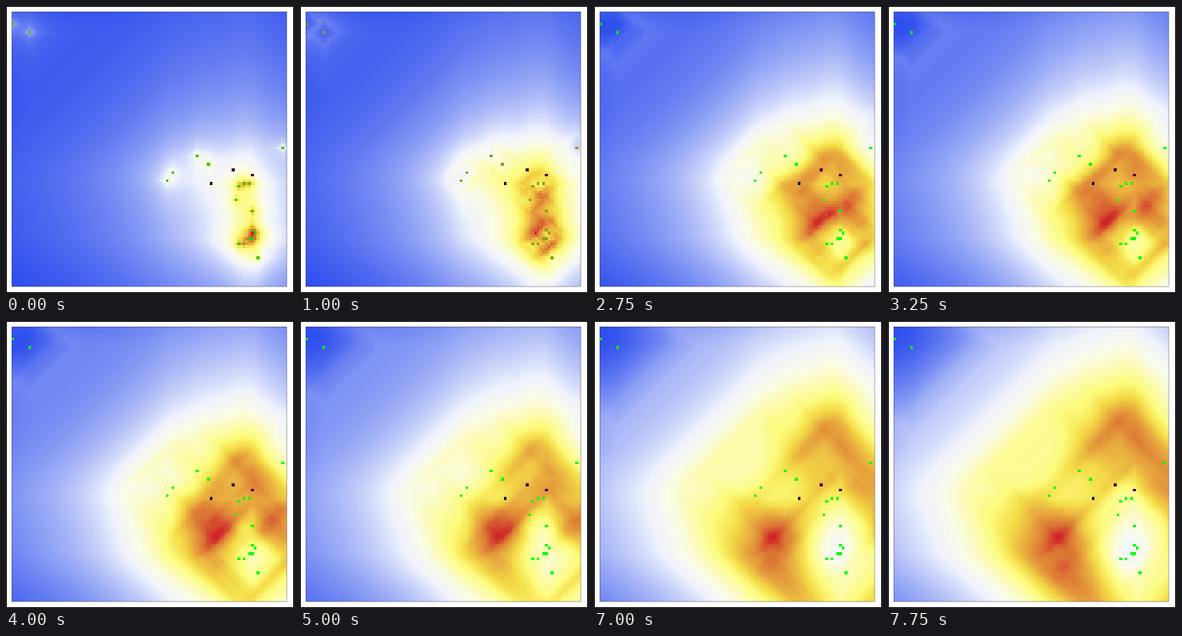
Animation of 360x359 px, one loop 8 s. Source, as a matplotlib script:

```python
import numpy as np
import matplotlib.pyplot as plt
from matplotlib.animation import FuncAnimation
from matplotlib.colors import LinearSegmentedColormap, to_rgb
from matplotlib.patches import Rectangle

# Geographic profiling (Rossmo's formula) with a growing buffer radius
W, H, DPI = 360, 359, 64
EDGE, SIDE = 6.55, 344
CELLS, STEPS, INTERVAL = 100, 32, 250
F, G = 0.5, 1.0

# Sites as (column, row) cells: the far pair, the middle arc, the cluster
FAR = [(0, 4), (6, 7)]
ARC = [(67, 52), (71, 55), (58, 58), (56, 61), (98, 49)]
CLUSTER = [(82, 63), (84, 62), (86, 62), (81, 68), (87, 72), (87, 79),
           (88, 80), (86, 82), (87, 82), (82, 84), (84, 84), (89, 89)]
SITES = FAR + ARC + CLUSTER
PURPLE = [(80, 57), (87, 59)]
BLACK = [(72, 62)]

CMAP = LinearSegmentedColormap.from_list("temperature", [
    (0, "#2e4eee"), (5 / 12, "#eff3fd"), (1 / 2, "#fbfce9"),
    (2 / 3, "#fdfb7b"), (3 / 4, "#f4dc48"), (11 / 12, "#db7334"),
    (1, "#d0222a")], N=512)

rows, cols = np.mgrid[0:CELLS, 0:CELLS]
DIST = np.array([abs(cols - x) + abs(rows - y) for x, y in SITES], float)


def profile(radius):
    outside = np.maximum(DIST, radius) ** -F
    inside = radius ** (G - F) / (2 * radius - np.minimum(DIST, radius)) ** G
    score = np.where(DIST > radius, outside, inside).sum(axis=0)
    return (score - score.min()) / np.ptp(score)


def site_color(step):
    if step == 0:
        return "#3dc70f"
    return "#87a11a" if step < 7 else "#00ff00"


def picture(step):
    rgb = CMAP(profile(step + 1.0))[..., :3]
    for cells, color in ((SITES, site_color(step)),
                         (PURPLE, "#500050"), (BLACK, "black")):
        for x, y in cells:
            rgb[y, x] = to_rgb(color)
    return rgb


fig = plt.figure(figsize=(W / DPI, H / DPI), dpi=DPI, facecolor="white")
ax = fig.add_axes([0, 0, 1, 1])
image = ax.imshow(picture(0), interpolation="nearest", aspect="auto",
                  extent=(EDGE, EDGE + SIDE, EDGE + SIDE, EDGE))
ax.set(xlim=(0, W), ylim=(H, 0))
ax.axis("off")


def outline(x, y, w, h, color, alpha=1.0):
    ax.add_patch(Rectangle((x, y), w, h, fill=False, edgecolor=color,
                           alpha=alpha, linewidth=72 / DPI, snap=False))


outline(0.5, 0.5, W - 1, H - 1, "black")
outline(7.5, 7.5, SIDE - 0.5, SIDE - 0.5, "0.3", 0.45)


def update(step):
    image.set_data(picture(step))
    return [image]


anim = FuncAnimation(fig, update, frames=STEPS, interval=INTERVAL,
                     repeat=True, repeat_delay=0, blit=False)
plt.show()
```
